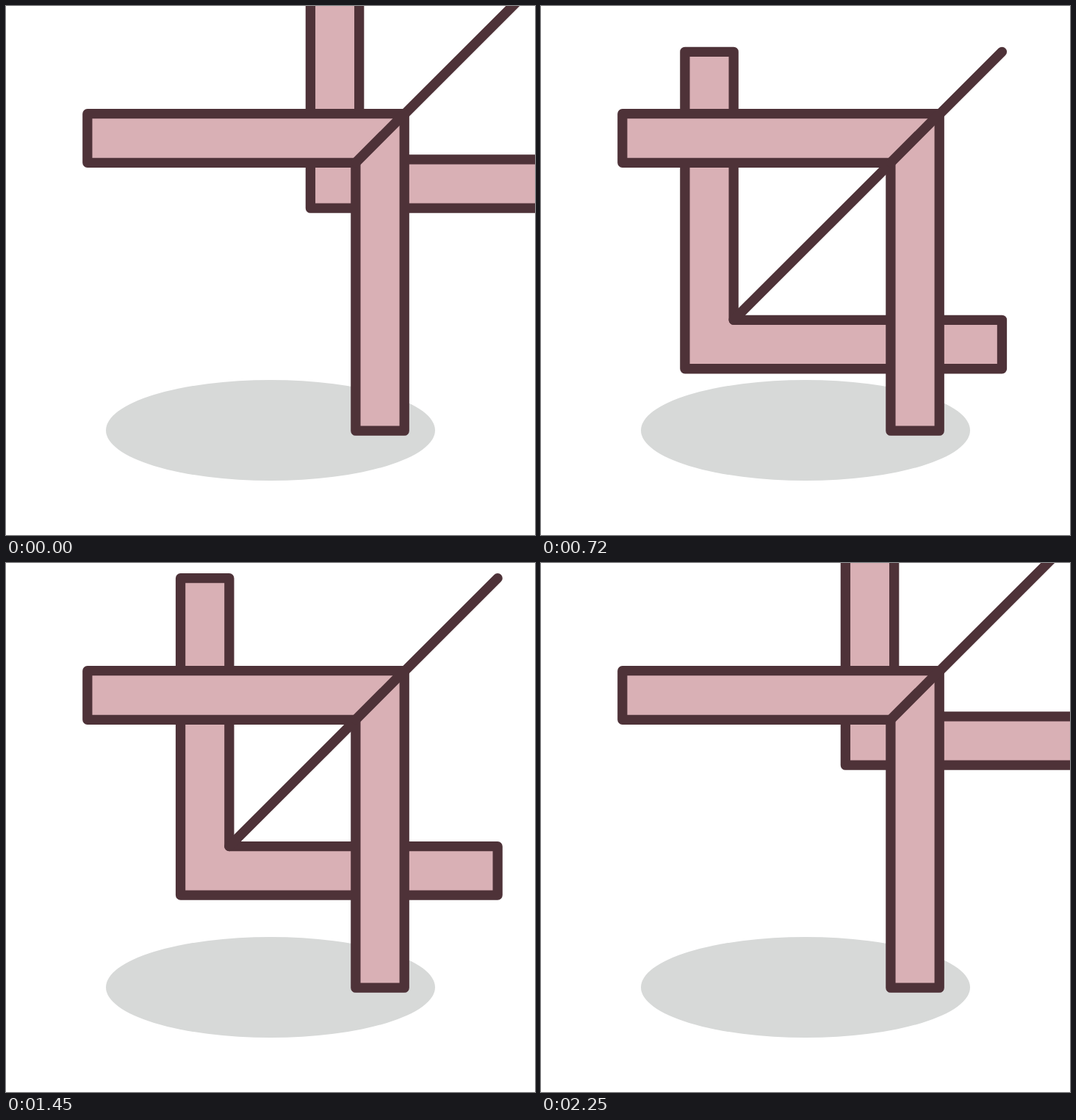
An HTML page that plays this animation: 720 by 720 pixels, repeating every 2.37 s.

```html
<!DOCTYPE html>
<html lang="en">
<head>
<meta charset="utf-8">
<title>Crop tool</title>
<style>
  html, body { margin: 0; width: 100%; height: 100%; overflow: hidden; background: #fff; }
  svg { display: block; width: 100%; height: 100%; }
  g { fill: #d9b0b5; stroke: #4e3238; stroke-width: 13.3; stroke-linejoin: round; stroke-linecap: round; }
</style>
</head>
<body>
<svg viewBox="0 0 720 720">
  <ellipse cx="360" cy="577.5" rx="224" ry="68.5" fill="#d7d9d8"/>
  <g id="back">
    <path d="M181.4 76.8H247.7V441.8H613V508.2H181.4Z"/>
    <path d="M247.7 441.8L613 76.8"/>
  </g>
  <g>
    <path d="M110.8 146.7H542.2V578.2H475.9V213.3H110.8Z"/>
    <path d="M475.9 213.3L542.2 146.7"/>
  </g>
</svg>
<script>
const LOOP = 2370, STEP = 40, CLOSE = 80, OPEN = 1290;
const TRAVEL = 236.5, CLOSED = -3.5;
// Easing knots: time in ms, progress, speed per ms
const knots = [
  [0, 0.0148, 0.0008],
  [320, 0.5624, 0.00171],
  [640, 0.924, 0.00062],
  [960, 1, 0]
];
const back = document.getElementById('back');

function ease(ms) {
  if (ms < 0) return 0;
  if (ms >= 960) return 1;
  const i = Math.floor(ms / 320);
  const [t0, p0, v0] = knots[i], [t1, p1, v1] = knots[i + 1];
  const span = t1 - t0, h = (ms - t0) / span, k = 1 - h;
  return p0 * k * k * (1 + 2 * h) + p1 * h * h * (3 - 2 * h)
    + span * h * k * (v0 * k - v1 * h);
}

const progress = (t, start) => ease(Math.floor((t - start) / STEP) * STEP);

function draw() {
  const t = performance.now() % LOOP;
  const open = t < OPEN ? 1 - progress(t, CLOSE) : progress(t, OPEN);
  const d = CLOSED + TRAVEL * open;
  back.setAttribute('transform', `translate(${d} ${-d})`);
  requestAnimationFrame(draw);
}
draw();
</script>
</body>
</html>
```
